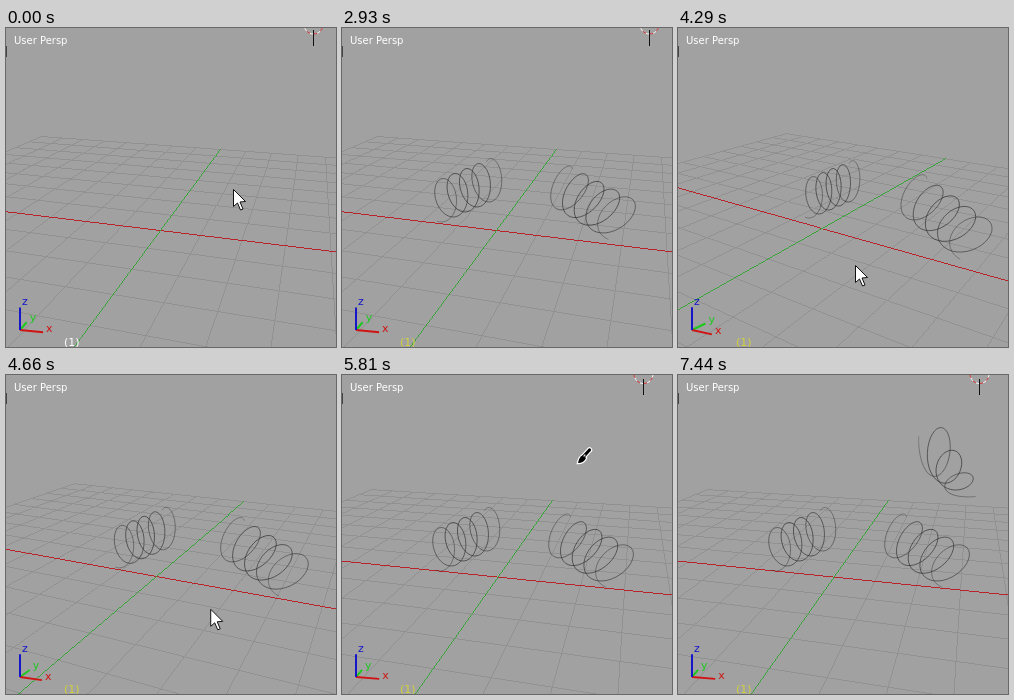
Animation of 330 by 319 pixels, one loop 8 s. Source, as an HTML page with a canvas:

```html
<!DOCTYPE html>
<html lang="en">
<head>
<meta charset="utf-8">
<title>Viewport sketch</title>
<style>
html, body { margin: 0; width: 100%; height: 100%; overflow: hidden; background: #a1a1a1; }
canvas { display: block; width: 330px; height: 319px; }
</style>
</head>
<body>
<canvas id="view" width="330" height="319"></canvas>
<script>
const ctx = document.getElementById('view').getContext('2d');
const W = 330, H = 319, LOOP = 8000;
const FOCAL = 476, CX = 165, CY = 160, HALF = 8;

// Camera poses: yaw in degrees, sine of pitch, distance, origin offset.
const HOME = [16.1, 0.336, 11.7, -0.0231, -0.0882];
const TURNED = [34, 0.326, 12.1, -0.0452, -0.084];
const SETTLED = [14.6, 0.31, 11.6, -0.0196, -0.0874];

// A coil is an ellipse whose centre and radii drift by `drift` per turn.
// base and drift: centre x, centre y, radius x, radius y.
// turned: the affine skew it takes when the view is fully turned.
const rightCoil = {
  base: [218.5, 157.5, 12, 20], drift: [13.8, 7.7, 2.2, 0],
  spin: -1, lean: 0.38, from: -0.1, to: 4.45,
  turned: [1.083, 0.179, -0.077, 1.059, 10, -40]
};
const leftCoil = {
  base: [150.7, 150.5, 11.4, 20.5], drift: [-11.85, 5, 0.55, 0],
  spin: 1, lean: -0.1, from: -0.1, to: 4.55,
  turned: [0.789, 0.066, -0.086, 0.955, 68.6, -1.8]
};
const topCoil = {
  base: [250.5, 63.5, 12.5, 34], drift: [10.1, 14.8, 1.4, -8],
  spin: -1, lean: 0, from: 0.22, to: 3.6,
  turned: [1, 0, 0, 1, 0, 0]
};

const lerp = (a, b, t) => a + (b - a) * t;
const smooth = t => t * t * (3 - 2 * t);
const linear = t => t;

// Value at time t from [time, value...] keys.
function track(keys, t, ease = linear) {
  if (t <= keys[0][0]) return keys[0].slice(1);
  for (let i = 1; i < keys.length; i++) {
    const a = keys[i - 1], b = keys[i];
    if (t <= b[0]) {
      const f = ease((t - a[0]) / (b[0] - a[0]));
      return a.slice(1).map((v, j) => lerp(v, b[j + 1], f));
    }
  }
  return keys[keys.length - 1].slice(1);
}

function coilAt(coil, turn) {
  const [cx, cy, rx, ry] = coil.base.map((v, i) => v + coil.drift[i] * turn);
  const a = 2 * Math.PI * turn, up = ry * Math.cos(a);
  return [cx + coil.spin * rx * Math.sin(a) + coil.lean * up, cy - up];
}

function line(points, color, width) {
  ctx.beginPath();
  points.forEach(([x, y]) => ctx.lineTo(x, y));
  ctx.strokeStyle = color;
  ctx.lineWidth = width;
  ctx.stroke();
}

// One-pixel line without antialiasing.
function pixelLine([x0, y0], [x1, y1], color) {
  ctx.fillStyle = color;
  const n = Math.ceil(Math.max(Math.abs(x1 - x0), Math.abs(y1 - y0)));
  for (let i = 0; i <= n; i++) {
    const x = Math.round(lerp(x0, x1, i / n)), y = Math.round(lerp(y0, y1, i / n));
    if (x >= 0 && x < W && y >= 0 && y < H) ctx.fillRect(x, y, 1, 1);
  }
}

function text(s, x, y, color, size = 11) {
  ctx.font = size + 'px "DejaVu Sans", sans-serif';
  ctx.fillStyle = color;
  ctx.fillText(s, x, y);
}

function drawFloor([yaw, sp, dist, ox, oy]) {
  const s = Math.sin(yaw * Math.PI / 180), c = Math.cos(yaw * Math.PI / 180);
  const cp = Math.sqrt(1 - sp * sp);
  const project = (x, y) => {
    const side = (x * c + y * s) / dist, ahead = (y * c - x * s) / dist;
    const w = 1 + cp * ahead;
    return [CX + FOCAL * (ox + side) / w, CY - FOCAL * (oy + sp * ahead) / w];
  };
  const along = (n, color) => pixelLine(project(-HALF, n), project(HALF, n), color);
  const across = (n, color) => pixelLine(project(n, -HALF), project(n, HALF), color);
  for (let n = -HALF; n <= HALF; n++) {
    if (!n) continue;
    along(n, '#919191');
    across(n, '#919191');
  }
  along(0, '#b8242a');
  across(0, '#3aa53a');

  // Orientation gizmo
  const size = 24, gx = 14, gy = 302;
  const axis = (name, dx, dy, color, lx, ly) => {
    line([[gx, gy], [gx + dx, gy + dy]], color, 2);
    text(name, gx + dx + lx, gy + dy + ly, color);
  };
  axis('y', size * s, -size * sp * c, '#1ec81e', 3, -1);
  axis('x', size * c, size * sp * s, '#d01414', 3, 0);
  axis('z', 0, -size * cp, '#1616c8', 2, -2);
}

// Ink is faint where the pen lands and lifts.
function drawCoil(coil, end, k = 0, dx = 0, dy = 0) {
  const [a, b, c, d, e, f] = [1, 0, 0, 1, 0, 0].map((v, i) => lerp(v, coil.turned[i], k));
  const place = turn => {
    const [x, y] = coilAt(coil, turn);
    return [a * x + c * y + e + dx + 0.5, b * x + d * y + f + dy + 0.5];
  };
  const step = 1 / 32;
  for (let u = coil.from; u < end; u += step) {
    const done = (u - coil.from) / (coil.to - coil.from);
    const ink = 0.28 + 0.37 * Math.sqrt(Math.sin(Math.PI * done));
    line([place(u), place(Math.min(u + step, end))], `rgba(40,40,40,${ink})`, 1);
  }
}

function drawMarker(x, y) {
  const parts = 16, step = 2 * Math.PI / parts;
  for (let i = 0; i < parts; i++) {
    ctx.beginPath();
    ctx.arc(x, y, 9.5, i * step, (i + 1) * step);
    ctx.strokeStyle = i % 2 ? '#e03030' : '#fff';
    ctx.lineWidth = 1;
    ctx.stroke();
  }
  pixelLine([x - 0.5, y + 5], [x - 0.5, y + 20], '#111');
}

function drawArrow(x, y) {
  ctx.save();
  ctx.translate(x + 0.5, y + 0.5);
  const shape = new Path2D('M0 0V17L4 13.5L7 20.5L9.5 19.5L6.5 12.5L12 12Z');
  ctx.fillStyle = '#fff';
  ctx.fill(shape);
  ctx.strokeStyle = '#111';
  ctx.lineWidth = 1;
  ctx.stroke(shape);
  ctx.restore();
}

function drawBrush(x, y) {
  ctx.save();
  ctx.translate(x, y);
  ctx.lineCap = 'round';
  const tip = new Path2D('M0 0Q1 -6 5 -8L8 -5Q6 0 0 0Z');
  const handle = [[6, -7], [11.5, -13]];
  ctx.strokeStyle = '#fff';
  ctx.lineWidth = 2.5;
  ctx.stroke(tip);
  line(handle, '#fff', 5.5);
  line(handle, '#000', 3.2);
  ctx.fillStyle = '#000';
  ctx.fill(tip);
  line([[6, -7], [7, -8]], '#ddd', 1.2);
  ctx.restore();
}

const rightKeys = [[400, rightCoil.from], [820, 1.2], [1370, 3.6], [1640, 3.78], [1720, rightCoil.to]];
const topKeys = [[6000, topCoil.from], [6800, topCoil.to]];
const toRight = [[60, 227, 161], [400, ...coilAt(rightCoil, rightCoil.from)]];
const orbit = [[3400, 226, 233], [4290, 177, 237], [5000, 228, 231]];
const toTop = [[5190, 228, 231], [5720, 236, 88], [5820, 236, 88], [6000, ...coilAt(topCoil, topCoil.from)]];
const leave = [[6800, ...coilAt(topCoil, topCoil.to)], [7340, 191, 216]];

function drawPointer(t) {
  if (t < 250) drawArrow(...track(toRight, t));
  else if (t < 400) drawBrush(...track(toRight, t));
  else if (t < 1715) drawBrush(...coilAt(rightCoil, track(rightKeys, t)[0] + 0.1));
  else if (t < 3485) return;
  else if (t < 5190) drawArrow(...track(orbit, t, smooth));
  else if (t < 5500) drawArrow(...track(toTop, t, smooth));
  else if (t < 6000) drawBrush(...track(toTop, t, smooth));
  else if (t < 6880) drawBrush(...coilAt(topCoil, track(topKeys, t)[0]));
  else if (t < 7435) drawArrow(...track(leave, t, smooth));
}

function draw(t) {
  const k = track([[3400, 0], [4290, 1], [5000, 0]], t, smooth)[0];
  const m = track([[4290, 0], [5000, 0.7], [5190, 0.7], [5700, 1]], t, smooth)[0];
  const pose = HOME.map((v, i) => v + k * (TURNED[i] - v) + m * (SETTLED[i] - v));

  ctx.fillStyle = '#a1a1a1';
  ctx.fillRect(0, 0, W, H);
  drawFloor(pose);

  drawCoil(rightCoil, track(rightKeys, t)[0], k, -2 * m, m);
  if (t >= 2925) drawCoil(leftCoil, leftCoil.to, k, -2 * m, 2 * m);
  drawCoil(topCoil, track(topKeys, t)[0]);

  drawMarker(307.5 + 18 * k - 6 * m, -3.5 - 40 * k + 2.5 * m);
  ctx.fillStyle = '#444';
  ctx.fillRect(0, 18, 1, 11);
  text('User Persp', 8, 16, '#fff', 10);
  text('(1)', 58, 318, t < 400 ? '#fff' : '#d2d23c');
  drawPointer(t);
}

function frame(now) {
  draw(now % LOOP);
  requestAnimationFrame(frame);
}
draw(0);
requestAnimationFrame(frame);
</script>
</body>
</html>
```
